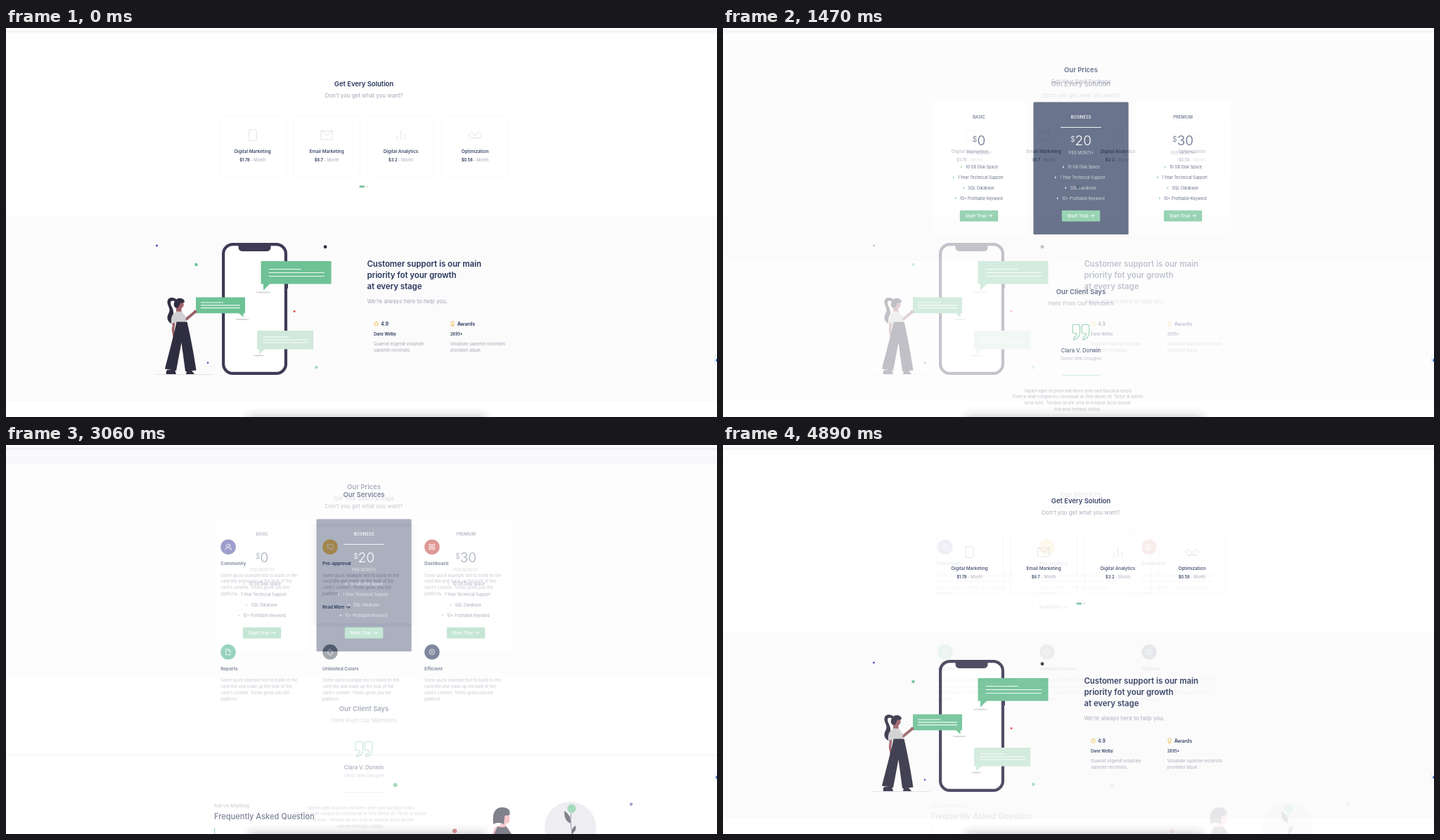
Write an HTML page that moves like this. It is 1011x554 px and loops after 4.95 s.

```html
<!DOCTYPE html>
<html lang="en">
<head>
<meta charset="utf-8">
<title>Landing page sections</title>
<style>
  html, body { margin: 0; width: 100%; height: 100%; overflow: hidden; background: #fff; }
  svg { position: absolute; left: 0; top: 0; width: 1011px; height: 554px; font-family: Inter, "Open Sans", sans-serif; }
  #overlay { z-index: 2; }
</style>
</head>
<body>
<script>
const NAVY = '#27345a', MUTED = '#a5a5b8', GREEN = '#6ec296', DARK = '#2f2e41', PHONE = '#3f3a55', SKIN = '#9c5f66', PANEL = '#fbfbfb';

// Drawing helpers, each returning SVG markup
const text = (x, y, size, str, fill = NAVY, weight = 400, anchor = 'start', extra = '') =>
  `<text x="${x}" y="${y}" font-size="${size}" font-weight="${weight}" fill="${fill}" text-anchor="${anchor}" ${extra}>${str}</text>`;
const mid = (x, y, size, str, fill, weight) => text(x, y, size, str, fill, weight, 'middle');
const lines = (x, y, size, strs, anchor) =>
  strs.map((s, i) => text(x, y + i * 8.8, size, s, MUTED, 400, anchor)).join('');
const rect = (x, y, w, h, fill, r = 0, extra = '') =>
  `<rect x="${x}" y="${y}" width="${w}" height="${h}" rx="${r}" fill="${fill}" ${extra}/>`;
const dot = (x, y, r, fill) => `<circle cx="${x}" cy="${y}" r="${r}" fill="${fill}"/>`;
const shape = (d, fill) => `<path d="${d}" fill="${fill}"/>`;
const stroke = (d, color, w = 1, extra = '') =>
  `<path d="${d}" fill="none" stroke="${color}" stroke-width="${w}" stroke-linecap="round" stroke-linejoin="round" ${extra}/>`;
const at = (x, y, body) => `<g transform="translate(${x} ${y})">${body}</g>`;
const arrow = (x, y, color) => stroke(`M${x} ${y}h5m-2 -2l2 2l-2 2`, color, .8);
const heading = (y, title, sub) => mid(509, y, 9.45, title, NAVY, 600) + mid(509, y + 16, 7.9, sub, MUTED);
const shadow = (x, y, rx) => `<ellipse cx="${x}" cy="${y}" rx="${rx}" ry=".9" fill="#d3d3d6"/>`;

function bubble(x, y, w, h, fill, tail, [lx, ly, short, long, gap]) {
  return rect(x, y, w, h, fill) + shape(tail, fill) +
    stroke(`M${lx} ${ly}h${short}m${-short} ${gap}h${long}m${-long} ${gap}h${long}`, '#fff', 1.2, 'opacity=".9"');
}

function supportArt() {
  const woman =
    stroke('M213 493.5H294', '#dedee2', .8) +
    shape('M242 386C236 382 229 384 229.500 391C230 397 235 400 231 407C227.500 413 230 420 238 422C233 417 239 412 238 404C237.500 398 234 396 234 391C234 388 238 388 241 390Z', DARK) +
    stroke('M239 418L237.500 430L239 439', SKIN, 3.4) +
    stroke('M251 411L256 415L268 405', SKIN, 3.6) + dot(269, 404, 2.3, SKIN) +
    shape('M242 396H249.500V407H242Z', SKIN) + dot(247.5, 394, 5.2, SKIN) +
    shape('M239 396C237 385 250 381 254 389Q254 392 248 391.500L245 398Q241 400 239 396Z', DARK) +
    shape('M238 407L243 403.500L250 404L256 412L255 419.500H241L235 421Q234 412 238 407Z', '#cfcfd1') +
    shape('M242.500 418.500H257.500C262 438 267 463 270.500 487.500L255 489L249.500 448L242 488L226 485.500C231 465 238 440 242.500 418.500Z', DARK) +
    shape('M229 487H240L242 493H228Q227 490 229 487ZM257 488H264L268 493H256Z', DARK);
  const phone =
    rect(309.1, 308.1, 88.8, 183.8, '#fff', 13.5, `stroke="${PHONE}" stroke-width="4.2"`) +
    shape('M330.500 307H376.500V312Q376.500 318 370 318H337Q330.500 318 330.500 312Z', PHONE) +
    rect(398.5, 364, 2.5, 7, PHONE);
  return phone +
    shadow(366, 376.5, 11) + shadow(336, 415, 10) + shadow(360, 466.5, 8) +
    bubble(362.5, 332, 100, 32.5, GREEN, 'M366 364V373.500L375.500 364Z', [374, 343.5, 45, 78.5, 5]) +
    bubble(270, 383.5, 70, 22.8, GREEN, 'M331 406L337.500 412V406Z', [277.5, 391, 31, 55, 3.8]) +
    bubble(357, 431, 80, 26.5, '#d0e9dc', 'M360 457V464.500L368 457Z', [366, 440, 36, 63.5, 4]) +
    woman +
    dot(214.5, 310, 1.4, '#4238b0') + dot(270.5, 337, 2.3, GREEN) + dot(454, 311.7, 2.4, DARK) +
    dot(410, 403.5, 1.6, '#f0525a') + dot(287, 476.7, 1.2, '#4b3ac0') + dot(441.3, 483.2, 2.2, '#a3dac0');
}

function solutions() {
  const cards = [
    ['Digital Marketing', '$1.78', 'M-4 -8H4Q5.500 -8 5.500 -6V6Q5.500 7.500 4 7.500H-4Q-5.500 7.500 -5.500 6V-6Q-5.500 -8 -4 -8Z'],
    ['Email Marketing', '$6.7', 'M-8 -6.500H8V6H-8ZL0 0L8 -6.500'],
    ['Digital Analytics', '$3.2', 'M-5.500 6V2M0 6V-7M5.500 6V-2'],
    ['Optimization', '$0.58', 'M-5 4A4 4 0 1 1 -4.900 4H5A4 4 0 1 1 5.100 4']
  ].map(([name, price, icon], i) => at(350.7 + i * 105.4, 0,
    rect(-47.3, 125, 94.6, 86, '#fff', 3, 'stroke="#f7f7f9" stroke-width=".8"') +
    at(0, 153, stroke(icon, '#d9d9dd', .7)) +
    mid(0, 178, 6.45, name, NAVY, 500) +
    mid(0, 190, 5.6, `<tspan font-weight="600" fill="${NAVY}">${price}</tspan> - Month`, MUTED)));

  return rect(0, 267, 1011, 265, PANEL) +
    heading(83, 'Get Every Solution', "Don't you get what you want?") + cards.join('') +
    rect(502.5, 224.5, 7.5, 2.7, GREEN, 1.2) + dot(513.7, 225.8, 1.4, '#d5e4de') +
    supportArt() +
    ['Customer support is our main', 'priority fot your growth', 'at every stage']
      .map((s, i) => text(513.5, 339.8 + i * 16, 11.35, s, NAVY, 600)).join('') +
    text(513.5, 392.3, 7.9, "We're always here to help you.", MUTED) +
    stroke('M526.500 417.700L527.500 420L530 420.300L528.200 422L528.700 424.400L526.500 423.200L524.300 424.400L524.800 422L523 420.300L525.500 420Z', '#f2bd4b', .8) +
    stroke('M633 418H637V421Q637 422.500 635 422.500Q633 422.500 633 421ZM634 422.500L633.300 425L635 424.200L636.700 425L636 422.500', '#f2bd4b', .8) +
    text(533, 423.5, 6.9, '4.9', NAVY, 600) + text(641.7, 423.5, 7, 'Awards', NAVY, 600) +
    text(523, 438, 5.5, 'Dane Welby', NAVY, 600) + text(631.7, 438, 5.5, '2895*', NAVY, 600) +
    lines(523, 451.7, 5.75, ['Quaerat eligendi voluptate', 'sapiente reiciendis.']) +
    lines(631.7, 451.7, 5.75, ['Voluptate sapiente reiciendis', 'provident atque.']);
}

function prices() {
  const features = [['10 GB Disk Space', 345], ['1 Year Technical Support', 334], ['SQL Database', 348.5], ['10+ Profitable Keyword', 337]];
  const cards = [['BASIC', 0], ['BUSINESS', 20], ['PREMIUM', 30]].map(([name, price], i) => {
    const dark = i === 1, ink = dark ? '#fff' : NAVY, soft = dark ? '#b8bdcd' : MUTED;
    return at(i * 145, 0,
      rect(296.4, 105.5, 135.2, 188.5, dark ? '#2c3a5c' : '#fff', 1.5) +
      mid(364, 129.4, 5.85, name, ink, 500) +
      stroke('M335.500 141.500H392.500', dark ? '#fff' : '#f8f8fa', .9) +
      mid(364, 166.7, 19, `<tspan font-size="10.5" dy="-5">$</tspan><tspan dy="5">${price}</tspan>`, ink, 300) +
      mid(364, 180, 5.75, 'PER MONTH', soft) +
      features.map(([s, x], j) => {
        const y = 198 + j * 14.85;
        return shape(`M${x - 7} ${y - 1.8}l2.200 1.800l-2.200 1.800Z`, dark ? '#d5dfe6' : GREEN) +
          text(x, y + 2, 5.55, s, dark ? '#c3c8d5' : NAVY);
      }).join('') +
      rect(336.8, 259.8, 54.4, 15.8, GREEN, 1.3) +
      text(344.7, 269.7, 5.7, 'Start Trial', '#fff', 600, 'start', 'letter-spacing=".25"') +
      arrow(377.5, 267.3, '#fff'));
  });
  const mark = 'M499.500 422.500h5.500q2.500 0 2.500 2.500v8q0 9.500-8.800 11.200v-3.200q4.300-1.500 4.300-6h-3.500q-2.500 0-2.500-2.500v-7.500q0-2.500 2.500-2.500z';

  return rect(0, 17, 1011, 315, PANEL) +
    heading(63, 'Our Prices', 'Get Your Best Package') + cards.join('') +
    heading(379.3, 'Our Client Says', 'Here From Our Members') +
    stroke(mark, GREEN, 1.1) + at(13.2, 0, stroke(mark, GREEN, 1.1)) +
    mid(509, 462, 7.7, 'Clara V. Dorwin', NAVY, 500) +
    mid(509, 473.2, 5.85, 'Senior Web Designer', MUTED) +
    stroke('M482.500 494.500H536', '#b9e2cc', .9) +
    lines(504.5, 518.6, 5.75, [
      'Sapien eget mi proin sed libero enim sed faucibus turpis',
      'Viverra vitae congue eu consequat ac felis donec et. Tortor at auctor',
      'urna nunc. Tempus iaculis urna id volutpat lacus laoreet',
      'non eros tempus cloitou.'], 'middle');
}

function services() {
  const blurb = ['Some quick example text to build on the', 'card title and make up the bulk of the',
    "card's content. Trenlo gives you the", 'platform.'];
  const items = [
    ['Community', '#5c5fa9', 'M-4 4V3Q-4 1 -2 1H1Q3 1 3 3V4M-.500 -4A2 2 0 1 1 -.600 -4M2.500 -3.800Q4 -2 2.500 -.300M3.500 1.300Q4.800 2 4.800 4'],
    ['Pre-approval', '#f0b93f', 'M-4 -1V-3.500H4V3.500H1M-4 3.500V3.400M-4 1.200Q-1.700 1.300 -1.600 3.500M-4 -.800Q.300 -.500 .500 3.500'],
    ['Dashboard', '#ca5450', 'M-3.700 -3.700h2.900v2.900h-2.900zM.800 -3.700h2.900v2.900h-2.900zM-3.700 .800h2.900v2.900h-2.900zM.800 .800h2.900v2.900h-2.900z'],
    ['Reports', '#56b896', 'M-3 -4H.500L3 -1.500V4H-3ZM.500 -4V-1.500H3'],
    ['Unlimited Colors', '#6c737d', 'M0 -4L2.400 -1.400A3.300 3.300 0 1 1 -2.400 -1.400Z'],
    ['Efficient', '#2b3a5d', 'M0 -4.200L1.300 -3L3 -3L3 -1.300L4.200 0L3 1.300L3 3L1.300 3L0 4.200L-1.300 3L-3 3L-3 1.300L-4.200 0L-3 -1.300L-3 -3L-1.300 -3ZM0 -1.200A1.200 1.200 0 1 1 -.100 -1.200']
  ].map(([name, color, icon], i) => at(305.2 + i % 3 * 144.9, Math.floor(i / 3) * 149.6,
    dot(10.8, 145.2, 10.8, color) + at(10.8, 145.2, stroke(icon, '#fff', .8)) +
    text(0, 171, 6.45, name, NAVY, 600) + lines(0, 187.6, 5.78, blurb)));

  const woman =
    shape('M706 524H716V535Q716 539 711 539V545H703Z', '#f2a5ac') +
    shape('M693 540C691 525 695 516 705 516C714 516 718 520 716 527L709 528L708 540Q700 536 693 540Z', DARK) +
    shape('M691 554L695 545L704 541L714 545L718 554Z', '#f2a5ac') +
    shape('M694 554L699 543Q705 546 711 543L719 554Z', DARK);
  const plant =
    dot(802.5, 544.5, 36.5, '#e3e4ea') + stroke('M804 522Q801 538 806 556', '#57586a', 1) +
    shape('M803 539Q793 535 794 521Q804 527 803 539ZM804 554Q803 546 810 542Q812 550 804 554Z', DARK) +
    dot(804.3, 517.8, 6.2, GREEN);

  return rect(0, 4, 1011, 23.5, '#f7f7fb') +
    heading(74, 'Our Services', "Don't you get what you want?") +
    rect(437.3, 112.3, 143.4, 145.4, '#f5f5fa', 4) + rect(441.3, 116.3, 135.4, 137.4, '#fff', 1) +
    items.join('') +
    text(450, 232.6, 6, 'Read More', NAVY, 600) + arrow(483.8, 230.9, NAVY) +
    stroke('M0 441.500H1011', '#e8e8ec', .8) +
    dot(553.6, 484.2, 3, GREEN) + rect(887, 509.7, 3.8, 3.8, '#5c5fa9') +
    text(296, 515.8, 6.3, 'Ask Us Anything', MUTED, 500) +
    text(296, 533.3, 11.05, 'Frequently Asked Question', NAVY, 500) +
    rect(296, 545, 1.2, 9, GREEN) + woman + plant + dot(638, 549.6, 3.2, '#ca5450');
}

function overlay() {
  return `<defs>
      <linearGradient id="bar" x2="0" y2="1"><stop stop-color="#000" stop-opacity=".055"/><stop offset="1" stop-color="#000" stop-opacity="0"/></linearGradient>
      <filter id="blur" x="-20%" y="-100%" width="140%" height="300%"><feGaussianBlur stdDeviation="5"/></filter>
    </defs>` +
    rect(0, 0, 1011, 3.5, '#fff') + rect(0, 3.5, 1011, 5.5, 'url(#bar)') +
    rect(338, 546, 350, 30, '#000', 14, 'opacity=".08" filter="url(#blur)"') +
    rect(343, 550, 340, 30, '#000', 14, 'opacity=".03"') +
    rect(1007.5, 466.5, 10, 13, '#fff', 2, 'stroke="#e3e6ec" stroke-width=".8"') + dot(1011.7, 473.2, 2.6, '#3f7fe0');
}

const svg = (body, id = '') => `<svg id="${id}" viewBox="0 0 1011 554">${body}</svg>`;
document.body.innerHTML =
  [solutions, prices, services].map(draw => svg(rect(0, 0, 1011, 554, '#fff') + draw())).join('') + svg(overlay(), 'overlay');
const slides = [...document.querySelectorAll('svg')].slice(0, 3);

// Each slide holds, then the next one fades in over it in nine even steps
const PERIOD = 1650, HOLD = 1110, STEP = 60;
function frame(now) {
  const current = Math.floor(now / PERIOD) % 3, next = (current + 1) % 3;
  const fade = Math.max(0, Math.floor((now % PERIOD - HOLD) / STEP) + 1) / 10;
  slides.forEach((slide, i) => {
    slide.style.opacity = i === current ? 1 : i === next ? fade : 0;
    slide.style.zIndex = i === next ? 1 : 0;
  });
  requestAnimationFrame(frame);
}
frame(0);
</script>
</body>
</html>
```
